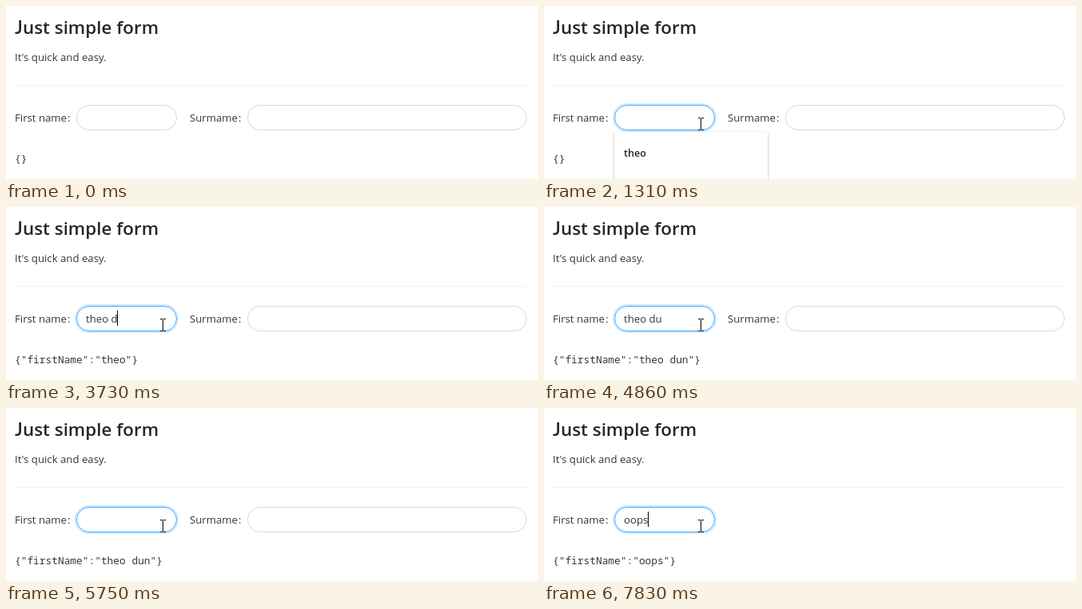
An HTML page that plays this animation: 666 px wide and 217 px high, repeating every 8 s.

```html
<!DOCTYPE html>
<html lang="en">
<head>
<meta charset="utf-8">
<title>Just simple form</title>
<style>
  html, body { margin: 0; width: 100%; height: 100%; overflow: hidden; background: #fff; }
  svg { display: block; width: 666px; height: 217px; }
  text { font: 13.2px "Open Sans", "Noto Sans", sans-serif; fill: #363636; white-space: pre; }
  .title { font-size: 22.4px; font-weight: 600; fill: #262626; }
  .title .cap { font-family: Lato, "Open Sans", sans-serif; font-size: 23px; }
  .mono { font: 12.85px "Noto Sans Mono", "DejaVu Sans Mono", monospace; }
  .option { font-size: 12.6px; font-weight: 600; fill: #262626; }
  .field { fill: #fff; stroke: #d9d9d9; }
  .panel { fill: #fff; filter: drop-shadow(0 1px 1.5px rgba(0, 0, 0, .32)); }
</style>
</head>
<body>
<svg viewBox="0 0 666 217">
  <rect width="666" height="217" fill="#fff"/>
  <text class="title" y="35"><tspan class="cap" x="11">J</tspan><tspan x="21">ust simple form</tspan></text>
  <text x="11" y="69">It's quick and easy.</text>
  <rect x="11" y="99" width="641" height="1" fill="#f0f0f0"/>

  <text x="11" y="145">First name<tspan dx="1">:</tspan></text>
  <rect id="glow" x="87" y="123" width="128" height="34" rx="17" fill="none" stroke="#1890ff" stroke-width="2"/>
  <rect id="first" class="field" x="88.5" y="124.5" width="125" height="31" rx="15.5"/>
  <text id="value" x="100" y="145"></text>
  <rect id="caret" width="1" height="19" fill="#000"/>

  <g id="surname">
    <text x="230" y="145">Surmame<tspan dx="1">:</tspan></text>
    <rect class="field" x="302.5" y="124.5" width="349" height="31" rx="15.5"/>
  </g>

  <text id="json" class="mono" x="11" y="196"></text>

  <g id="menu">
    <rect id="panel" class="panel" x="88" y="158" width="192" rx="2"/>
    <text id="option" class="option" x="100" y="189">theo</text>
  </g>

  <path id="arrow" d="M.5 .5V15.5L4 12.2L6.3 17.5L8.5 16.5L6.2 11.4H11Z" fill="#fff" stroke="#000"/>
  <path id="beam" d="M-3 -7.5H0M1 -7.5H4M.5 -7V7M-3 7.5H0M1 7.5H4" fill="none" stroke="#000"/>
</svg>
<script>
const LOOP = 8000, TICK = 70;
const $ = id => document.getElementById(id);
const [glow, first, value, caret, surname, json, menu, panel, option, arrow, beam] =
  ["glow", "first", "value", "caret", "surname", "json", "menu", "panel", "option", "arrow", "beam"].map($);

// [time, state] lists: the latest entry holds
const typed = [
  [0, ""], [1860, "t"], [2060, "th"], [2260, "the"], [2460, "theo"],
  [3460, "theo "], [3730, "theo d"], [3860, "theo du"], [4060, "theo dun"],
  [4860, "theo du"], [5330, "theo d"], [5400, "theo"], [5470, "th"], [5540, ""],
  [6020, "o"], [6150, "oo"], [6500, "oop"], [6770, "oops"]
];
const saved = [[0, null], [3000, "theo"], [4520, "theo dun"], [7300, "oops"]];
const blink = [
  [0, false], [830, true], [1310, false], [1860, true], [3000, false], [3460, true],
  [4590, false], [5130, true], [5750, false], [6020, true], [7300, false], [7830, true]
];

const at = (list, t) => list.reduce((now, [start, v]) => t >= start ? v : now, list[0][1]);
const clamp = x => Math.min(1, Math.max(0, x));
const mix = (a, b, p) => a + (b - a) * p;
const ticked = (t, from) => from + Math.floor((t - from) / TICK) * TICK;
const show = (el, on) => el.setAttribute("visibility", on ? "visible" : "hidden");
const move = (el, x, y) => el.setAttribute("transform", `translate(${Math.round(x)} ${Math.round(y)})`);

function drawMouse(t) {
  const p = clamp((ticked(t, 200) - 200) / 560);
  const ease = p * p * (3 - 2 * p);
  const x = mix(452, 196, ease), y = mix(211, 148, ease);
  const over = y < 156;
  show(arrow, t >= 200 && !over);
  show(beam, over);
  move(arrow, x, y);
  move(beam, x, y);
  return over;
}

function drawMenu(t) {
  let scale = 1, opacity = 0, ink = 1;
  const enter = (start, time) => {
    const p = clamp((time - start) / 140);
    opacity = 1 - (1 - p) ** 2;
    scale = 1 - .2 * (1 - p) ** 2;
  };
  const leave = (start, time) => {
    const p = clamp((time - start) / 200);
    opacity = 1 - p;
    ink = 1 - p;
    scale = 1 - .16 * p * p;
  };
  if (t >= 5540) leave(5540, ticked(t, 5540));
  else if (t >= 5400) enter(5330, ticked(t, 5330));
  else if (t >= 2460) leave(2460, ticked(t, 2460));
  else if (t >= 830) enter(810, ticked(t, 200));
  panel.setAttribute("height", t < 1860 ? 90 : 52);
  option.setAttribute("opacity", ink);
  menu.setAttribute("opacity", opacity);
  menu.setAttribute("transform", `translate(184 184) scale(${scale}) translate(-184 -184)`);
}

function draw(t) {
  const over = drawMouse(t);
  first.style.stroke = over ? "#40a9ff" : "";
  glow.setAttribute("opacity", .2 * clamp((ticked(t, 200) - 810) / 300));

  const text = at(typed, t);
  value.textContent = text;
  const width = text ? value.getComputedTextLength() : 0;
  caret.setAttribute("x", Math.floor(100 + width));
  caret.setAttribute("y", t < 1860 ? 131 : 130);
  show(caret, at(blink, t));

  const name = at(saved, t);
  json.textContent = name ? JSON.stringify({ firstName: name }) : "{}";
  show(surname, t < 6770);
  drawMenu(t);
}

const begin = performance.now();
function frame() {
  draw((performance.now() - begin) % LOOP);
  requestAnimationFrame(frame);
}
frame();
</script>
</body>
</html>
```
